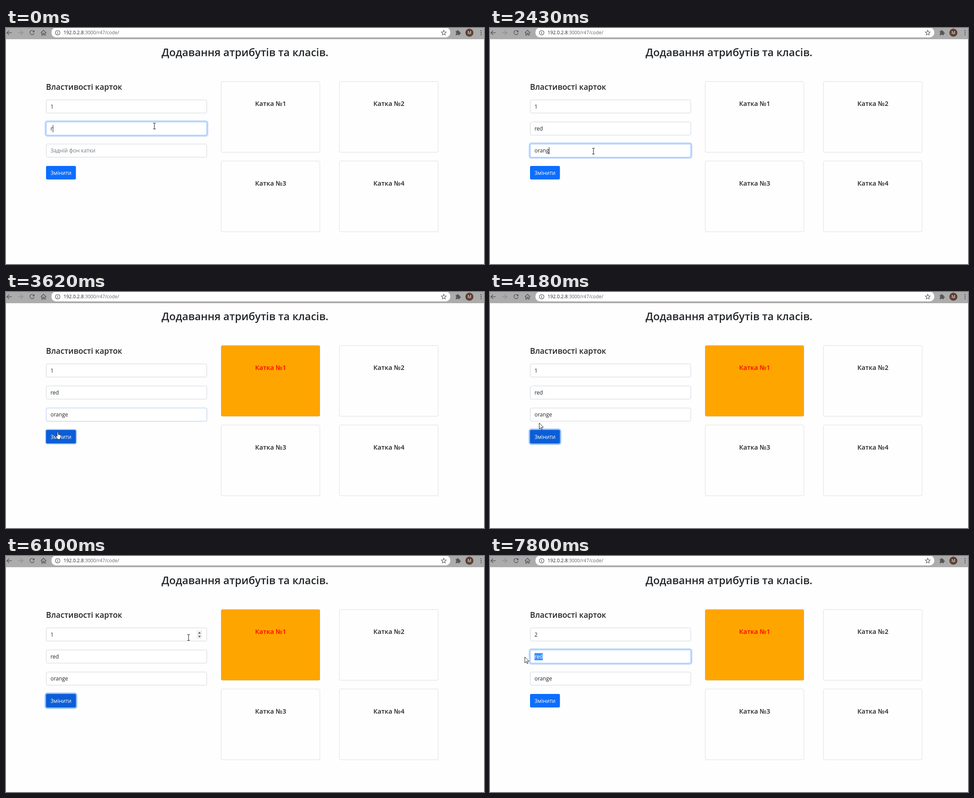
These frames come from a looping animation (1063x527 px, 8 s). An HTML page:

```html
<!DOCTYPE html>
<html lang="uk">
<head>
<meta charset="utf-8">
<title>Картки</title>
<style>
  html, body { margin: 0; width: 100%; height: 100%; overflow: hidden; background: #fff; }
  svg { display: block; width: 100vw; height: 100vh; }
  text { font-family: "Open Sans", "Noto Sans", sans-serif; font-size: 11.9px; fill: #212529; white-space: pre; }
  .bold { font-weight: 600; }
  .mid { text-anchor: middle; }
  .icon { fill: none; stroke: #54585c; stroke-width: 1.4; }
</style>
</head>
<body>
<svg id="stage" viewBox="0 0 1063 527">
  <rect width="1063" height="527" fill="#fefefe"/>
  <g id="bar">
    <rect width="1063" height="25" fill="#acacac"/>
    <rect x="101" y="-1" width="887" height="22" rx="10.5" fill="#fff"/>
    <path class="icon" d="M12.5 10.5H2M7 5.5l-5 5 5 5"/>
    <path class="icon" style="stroke:#8b8d8f" d="M27 10.5h10.5M32.500 5.500l5 5-5 5"/>
    <path class="icon" d="M61.600 7A4.800 4.800 0 1 0 62.600 11.500"/>
    <path d="M63.200 4.500v4.800h-4.800z" fill="#54585c"/>
    <path class="icon" d="M77.500 10.700L83.500 5l6 5.700M79.500 9.500v6.300h2.600v-4h2.800v4h2.600V9.500"/>
    <circle class="icon" style="stroke-width:1.200" cx="115" cy="10.500" r="5"/>
    <path class="icon" d="M115 9.800v3.400M115 7.300v1.400"/>
    <text x="128" y="14.300" style="font-size:10.600px">192.0.2.8<tspan fill="#5f6368">:3000/r47/code/</tspan></text>
    <path id="star" class="icon" style="stroke-width:1.100"/>
    <path d="M1000 7h2.800a1.800 1.800 0 1 1 3.400 0h2.800v2.800a1.800 1.800 0 1 1 0 3.400v2.800h-3a1.600 1.600 0 0 0-3.200 0h-2.800v-3a1.600 1.600 0 0 0 0-3.200z" fill="#54585c"/>
    <circle cx="1030.500" cy="10.500" r="9" fill="#5d4037"/>
    <text class="mid" x="1030.500" y="13.800" style="font-size:9px;fill:#fff">M</text>
    <g fill="#54585c"><circle cx="1056.500" cy="6" r="1.300"/><circle cx="1056.500" cy="10.500" r="1.300"/><circle cx="1056.500" cy="15" r="1.300"/></g>
  </g>
  <text class="bold mid" x="531.500" y="63" style="font-size:23.500px">Додавання атрибутів та класів.</text>
  <text class="bold" x="89" y="137.500" style="font-size:17.400px">Властивості карток</text>
  <g id="page"></g>
  <g id="mouse">
    <path id="beam" d="M-3-6.500h2.200l.8.700.8-.7H3M0-6V6M-3 6.500h2.200l.8-.7.8.7H3" fill="none" stroke="#222" stroke-width="1.100"/>
    <path id="arrow" d="M.5.500v13.200l3.100-2.900 2 4.700 2-.9-2-4.500h4.100z" fill="#fff" stroke="#222" stroke-width="1"/>
    <path id="hand" d="M-1.200 1.200q1.200-1.600 2.400 0V6l1.900.3 1.800.6 1.700.9q.6.600.6 1.800l-.6 3.400-1 1.600V17H-.8v-1.600L-4 10.800q-.8-1.800.9-1.900l1.900 1.700z" fill="#fff" stroke="#222" stroke-width="1"/>
  </g>
</svg>
<script>
const NS = 'http://www.w3.org/2000/svg';
const LOOP = 8000;
const page = document.getElementById('page');

function add(parent, tag, attrs, text) {
  const el = document.createElementNS(NS, tag);
  set(el, attrs);
  if (text) el.textContent = text;
  parent.appendChild(el);
  return el;
}
function set(el, attrs) {
  for (const k in attrs) el.setAttribute(k, attrs[k]);
}
const show = (el, on) => set(el, { visibility: on ? 'visible' : 'hidden' });
const clamp = v => Math.max(0, Math.min(1, v));
const ramp = (t, start) => clamp((t - start) / 150);

const starPoints = [...Array(10)].map((_, i) => {
  const a = i * Math.PI / 5, r = i % 2 ? 2.5 : 5.8;
  return (973.5 + r * Math.sin(a)).toFixed(1) + ' ' + (10.8 - r * Math.cos(a)).toFixed(1);
});
set(document.getElementById('star'), { d: 'M' + starPoints.join('L') + 'Z' });

// Cards
const cards = [0, 1, 2, 3].map(i => {
  const x = i % 2 ? 741.5 : 478.5, y = i < 2 ? 119.5 : 297;
  return {
    box: add(page, 'rect', { x, y, width: 219.5, height: 158, rx: 3, fill: '#fefefe', stroke: '#000', 'stroke-opacity': .125 }),
    label: add(page, 'text', { class: 'bold mid', x: x + 110, y: y + 54.5, style: 'font-size:14.6px' }, 'Катка №' + (i + 1))
  };
});

// Form
const LEFT = 89, WIDTH = 358, HEIGHT = 30.4, PAD = 99;
const rowY = i => 160 + 49.3 * i;

function makeRing(y, width, color, alpha) {
  const el = add(page, 'rect', { fill: color });
  return k => {
    const s = 3 * k;
    set(el, { x: LEFT - s, y: y - s, width: width + 2 * s, height: HEIGHT + 2 * s, rx: 3 + s, 'fill-opacity': alpha * k });
  };
}

const fields = [0, 1, 2].map(i => {
  const y = rowY(i);
  const ring = makeRing(y, WIDTH, '#0d6efd', .25);
  const box = add(page, 'rect', { x: LEFT + .5, y: y + .5, width: WIDTH - 1, height: HEIGHT - 1, rx: 3, fill: '#fff' });
  const mark = add(page, 'rect', { y: y + 7.5, height: 16, fill: '#3390ff' });
  const text = add(page, 'text', { x: PAD, y: y + 19.6 });
  const caret = add(page, 'rect', { y: y + 7.5, width: 1, height: 16, fill: '#111' });
  return { ring, box, mark, text, plain: add(text, 'tspan', {}), picked: add(text, 'tspan', { style: 'fill:#fff' }), caret };
});

const spin = add(page, 'g', {});
add(spin, 'rect', { x: 424, y: 166, width: 12, height: 19, fill: '#f0f0f0' });
const spinUp = add(spin, 'rect', { x: 424, y: 166, width: 12, height: 9.500, fill: '#c6c6c6' });
add(spin, 'path', { d: 'M427.300 173l2.900-3.300 2.900 3.300zM427.300 178.500l2.900 3.300 2.900-3.300z', fill: '#444' });

const button = { ring: makeRing(rowY(3), 66.500, '#3184fd', .5) };
button.box = add(page, 'rect', { x: LEFT, y: rowY(3), width: 66.5, height: HEIGHT, rx: 3 });
add(page, 'text', { class: 'mid', x: 122.2, y: rowY(3) + 19.7, style: 'fill:#fff;font-size:11.8px' }, 'Змінити');

// Bursts of screen updates: first, last, count
const bursts = [[0, 0, 1], [130, 130, 1], [430, 1410, 8], [1560, 1990, 4], [2430, 2590, 2],
  [2890, 3750, 7], [4050, 5070, 8], [5220, 6230, 8], [6510, 7120, 5], [7400, 7800, 4]];
const ticks = bursts.flatMap(([a, b, n]) => [...Array(n)].map((_, i) => n > 1 ? a + (b - a) * i / (n - 1) : a));
const hold = t => ticks.reduce((last, s) => s <= t + 12 ? s : last, 0);

// Pointer path: time, x, y
const path = [[0, 330, 219], [430, 330, 219], [850, 236, 272], [990, 236, 272], [1270, 230, 275],
  [2750, 230, 275], [3033, 110, 345], [3177, 70, 350], [3320, 92, 334], [3463, 115, 312], [3910, 115, 312],
  [4200, 103, 270], [4490, 150, 235], [5070, 350, 183], [5500, 321, 217], [5650, 323, 217],
  [6230, 434, 171], [6662, 434, 171], [7120, 125, 227], [7400, 125, 227], [7667, 93, 229], [7800, 77, 225]];

function pointer(t) {
  const i = path.findIndex(p => p[0] > t);
  if (i < 0) return path[path.length - 1].slice(1);
  const [a, b] = [path[i - 1], path[i]];
  const k = (t - a[0]) / (b[0] - a[0]);
  return [1, 2].map(j => a[j] + (b[j] - a[j]) * k);
}

const typed = (word, times, t) => word.slice(0, times.filter(s => s <= t + 12).length);

function mix(a, b, k) {
  return `rgb(${a.map((v, i) => Math.round(v + (b[i] - v) * k)).join()})`;
}

const cursors = ['beam', 'arrow', 'hand'].map(id => document.getElementById(id));
const mouse = document.getElementById('mouse');

function render(time) {
  const t = hold(time);
  const [x, y] = pointer(t);
  const inRow = i => y >= rowY(i) && y <= rowY(i) + HEIGHT;
  const over = x >= LEFT && x <= LEFT + WIDTH ? [0, 1, 2].findIndex(inRow) : -1;
  const onSpin = over === 0 && x > 424;
  const onButton = x >= LEFT && x <= 155 && inRow(3);

  const words = [t < 6500 ? '1' : '2', typed('red', [0, 130, 430], t), typed('orange', [1560, 1703, 1847, 1990, 2430, 2590], t)];
  const focus = [
    ramp(t, 6450) - ramp(t, 7340),
    1 - ramp(t, 800) + ramp(t, 7340),
    ramp(t, 800) - ramp(t, 3500)
  ];
  const carets = [t >= 6500 && t < 7100, t < 850 || t >= 7400, (t >= 850 && t < 1400) || (t >= 1550 && t < 3120)];

  fields.forEach((f, i) => {
    const word = words[i];
    const empty = !word;
    f.ring(focus[i]);
    set(f.box, { stroke: mix([206, 212, 218], [134, 183, 254], focus[i]) });
    f.plain.textContent = word || 'Задній фон катки';
    f.picked.textContent = '';
    f.text.style.fill = empty ? '#757b81' : '#212529';
    const edge = n => PAD + (n && !empty ? f.text.getSubStringLength(0, n) : 0);
    const end = edge(word.length);
    let from = word.length;
    if (i === 1 && t > 7400) {
      while (from > 0 && x < (edge(from) + edge(from - 1)) / 2) from--;
    }
    const start = edge(from);
    set(f.mark, { x: start, width: end - start });
    f.plain.textContent = (word || 'Задній фон катки').slice(0, empty ? undefined : from);
    f.picked.textContent = word.slice(from);
    set(f.caret, { x: Math.round(end) });
    show(f.caret, carets[i] && from === word.length);
  });

  show(spin, over === 0 || (t >= 6500 && t < 7400));
  set(spinUp, { opacity: onSpin && y < 175.5 ? 1 : 0 });

  button.ring(ramp(t, 3500) - ramp(t, 6450));
  set(button.box, { fill: onButton || (t > 3600 && t < 6500) ? '#0b5ed7' : '#0d6efd' });

  const painted = t >= 3600;
  set(cards[0].box, { fill: painted ? '#ffa500' : '#fefefe' });
  cards[0].label.style.fill = painted ? '#ff0000' : '#212529';

  const kind = onButton ? 2 : over >= 0 && !onSpin ? 0 : 1;
  cursors.forEach((c, i) => show(c, i === kind));
  set(mouse, { transform: `translate(${Math.round(x)} ${Math.round(y)})` });
}

const begin = performance.now();
function frame() {
  render((performance.now() - begin) % LOOP);
  requestAnimationFrame(frame);
}
frame();
</script>
</body>
</html>
```
